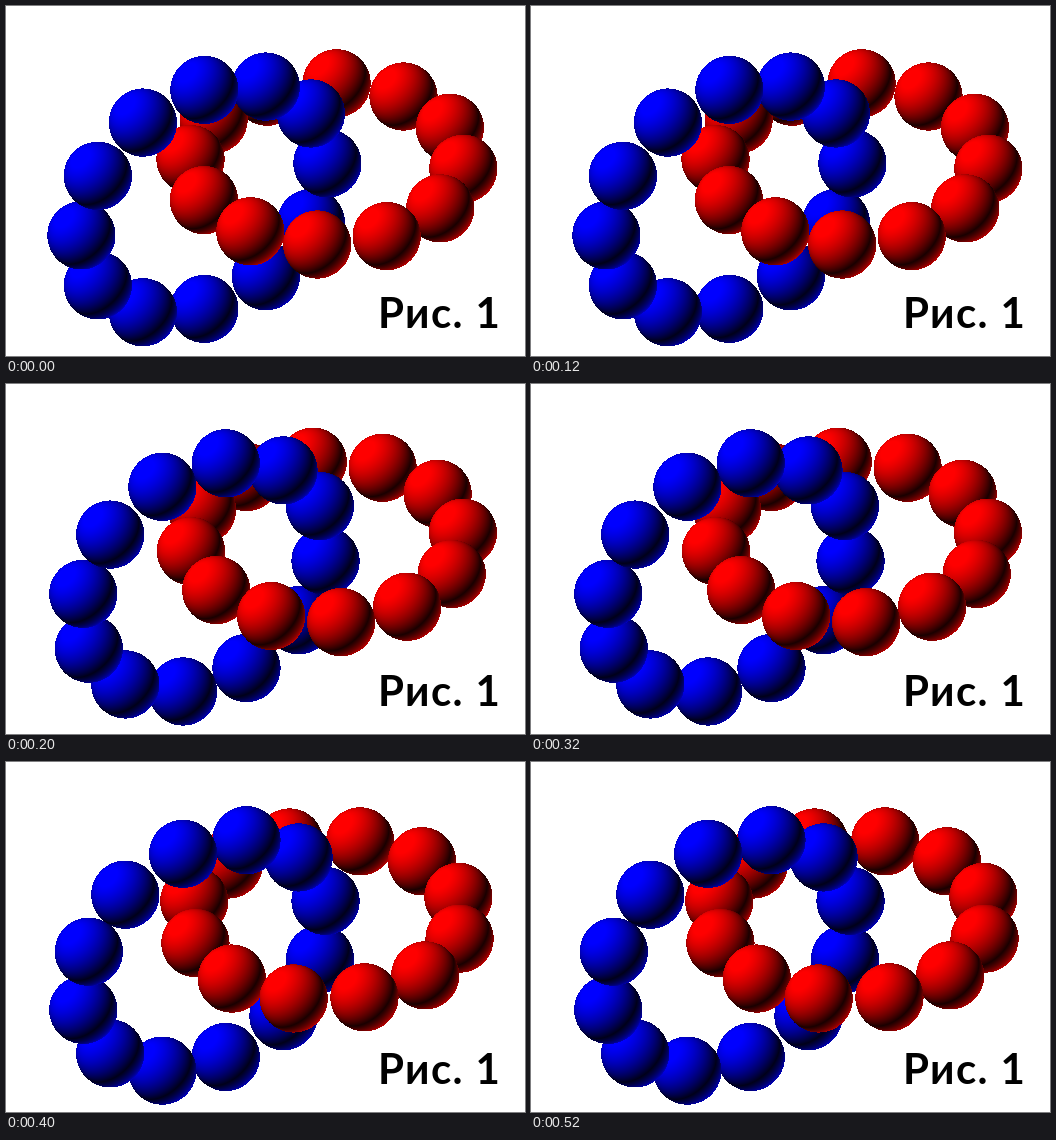
Recreate the animation shown at these times as an HTML page with a canvas. Size 519x350 px, loop 600 ms.

```html
<!DOCTYPE html>
<html lang="ru">
<head>
<meta charset="utf-8">
<title>Linked rings</title>
<style>
  html, body { margin: 0; width: 100%; height: 100%; overflow: hidden; background: #fff; }
  canvas { position: absolute; left: 0; top: 0; }
  .label {
    position: absolute; left: 372px; top: 281px;
    font: 700 42px/50px Lato, "Open Sans", sans-serif;
    letter-spacing: 1.4px; color: #000; white-space: pre;
  }
</style>
</head>
<body>
<canvas id="stage" width="519" height="350"></canvas>
<div class="label">Рис. 1</div>
<script>
const W = 519, H = 350;
const ctx = document.getElementById('stage').getContext('2d');
const RADIUS = 34.1, COUNT = 12, HOLD = 200, STEPS = 3, TURN = 10;
const LIGHT = [-0.537, -0.537, 0.65], AMBIENT = 0.1, GAIN = 0.95;

// Each ring is a tilted circle: center + u cos(t) + v sin(t).
const BLUE = 2, RED = 0;
const rings = [
  { channel: BLUE, spin: 1, center: [198.4, 193.4, 0], u: [123, -36, -48], v: [0, 109.5, -82] },
  { channel: RED, spin: -1, center: [320.9, 157.9, 0], u: [136.4, 4.8, 8.5], v: [-9.7, 80.6, 110] }
];

function place(ring, degrees) {
  const t = degrees * Math.PI / 180;
  const [x, y, z] = ring.center.map((c, k) => c + ring.u[k] * Math.cos(t) + ring.v[k] * Math.sin(t));
  return { x, y, z, channel: ring.channel };
}

// A sphere lit on both sides, so it brightens again past the terminator.
function paintBall(data, ball) {
  const left = Math.floor(ball.x - RADIUS), top = Math.floor(ball.y - RADIUS);
  for (let py = top; py <= ball.y + RADIUS; py++) {
    for (let px = left; px <= ball.x + RADIUS; px++) {
      const x = (px + 0.5 - ball.x) / RADIUS, y = (py + 0.5 - ball.y) / RADIUS;
      const d = x * x + y * y;
      if (d > 1) continue;
      const lit = Math.abs(x * LIGHT[0] + y * LIGHT[1] + Math.sqrt(1 - d) * LIGHT[2]);
      const i = (py * W + px) * 4;
      data.fill(0, i, i + 3);
      data[i + ball.channel] = 255 * Math.min(1, AMBIENT + GAIN * lit);
    }
  }
}

function draw(step) {
  const balls = rings.flatMap(ring => Array.from({ length: COUNT },
    (_, i) => place(ring, i * 360 / COUNT + ring.spin * step * TURN)));
  balls.sort((a, b) => a.z - b.z);
  const img = ctx.createImageData(W, H);
  img.data.fill(255);
  for (const ball of balls) paintBall(img.data, ball);
  ctx.putImageData(img, 0, 0);
}

const start = performance.now();
let shown = 0;
function tick() {
  const step = Math.floor((performance.now() - start) / HOLD) % STEPS;
  if (step !== shown) draw(shown = step);
  requestAnimationFrame(tick);
}
draw(0);
tick();
</script>
</body>
</html>
```
